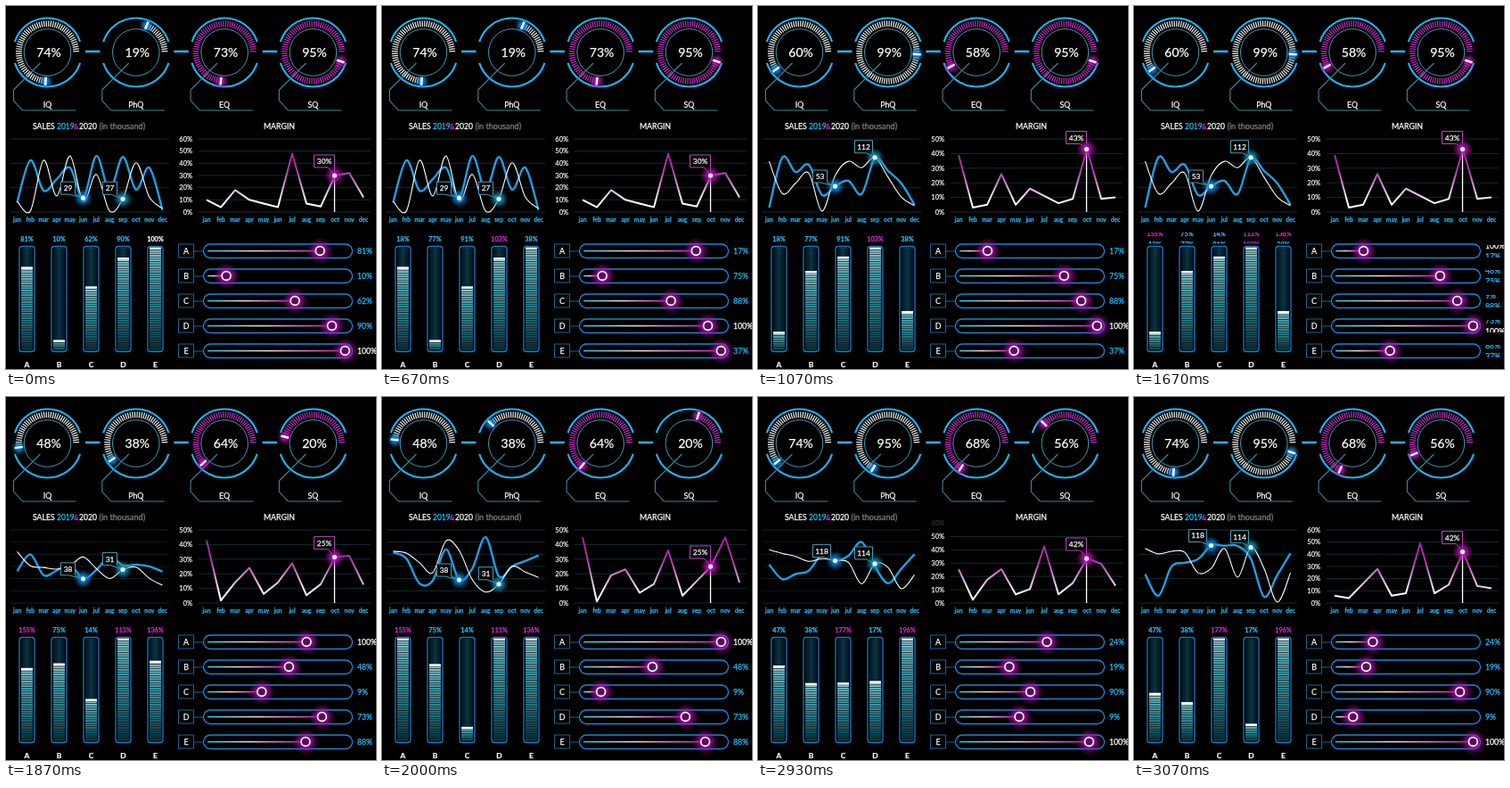
Write an HTML page that moves like this. It is 415 px wide and 407 px high and loops after 3140 ms.

```html
<!DOCTYPE html>
<html lang="en">
<head>
<meta charset="utf-8">
<title>Dashboard</title>
<style>
html, body { margin: 0; width: 100%; height: 100%; overflow: hidden; background: #000; }
svg { display: block; width: 415px; height: 407px; font-family: Lato, "Open Sans", sans-serif; }
text { fill: currentColor; stroke: currentColor; stroke-width: .25px; }
</style>
</head>
<body>
<svg id="stage" viewBox="0 0 415 407">
  <defs>
    <linearGradient id="heat" gradientUnits="userSpaceOnUse" x1="0" y1="155" x2="0" y2="231">
      <stop offset="0" stop-color="#a5189f"/><stop offset=".4" stop-color="#ad3aab"/>
      <stop offset=".85" stop-color="#fff"/><stop offset="1" stop-color="#fff"/>
    </linearGradient>
    <linearGradient id="fill" x1="0" y1="0" x2="0" y2="1">
      <stop offset="0" stop-color="#a4dfe8"/><stop offset=".25" stop-color="#55b3c1"/>
      <stop offset=".6" stop-color="#2f8796"/><stop offset="1" stop-color="#0e3743"/>
    </linearGradient>
    <linearGradient id="tube">
      <stop offset="0" stop-color="#03121a"/><stop offset=".5" stop-color="#0b3443"/>
      <stop offset="1" stop-color="#03121a"/>
    </linearGradient>
    <linearGradient id="wire">
      <stop offset="0" stop-color="#2fbfd8"/><stop offset=".45" stop-color="#e6d6e6"/>
      <stop offset="1" stop-color="#cc1cc4"/>
    </linearGradient>
    <pattern id="stripes" width="4" height="2.6" patternUnits="userSpaceOnUse">
      <rect width="4" height="1" fill="#000" fill-opacity=".75"/>
    </pattern>
  </defs>
</svg>
<script>
const LOOP = 3140, STEP = 200 / 3;

// When the cell labels roll and the charts morph, in steps
const cues = [
  { roll: [7, 10], morph: [10, 16] },
  { roll: [23.2, 27], morph: [25, 30] },
  { roll: [38.1, 41.4], morph: [40, 46] }];

// One row per data set; _ lies halfway between its neighbours
const _ = null;
const gauges = [[74, 19, 73, 95], [60, 99, 58, 95], [48, 38, 64, 20], [74, 95, 68, 56]];
const bars = [[81, 10, 62, 90, 100], [18, 77, 91, 103, 38], [155, 75, 14, 113, 136], [47, 38, 177, 17, 196]];
const sales19 = [
  [20, 106, 44, _, 91, 29, 115, 44, 113, 46, 91, 4],
  [9, 112, 82, 97, 35, 53, 64, 37, 110, _, 59, 15],
  [83, 73, 32, 37, 88, 38, 57, 108, 44, 60, _, 78],
  [59, 15, 75, _, 90, 118, _, 117, 91, 13, _, 102]].map(fillGaps);
const sales20 = [
  [22, 2, 106, 33, 115, 22, 77, 2, 27, 101, 31, 7],
  [104, 38, _, 80, 2, 75, 104, 91, 112, _, 31, 13],
  [85, 82, _, 50, 102, 86, 38, 18, 31, 60, _, 42],
  [112, 101, 106, 104, 62, 71, 112, 53, 114, 71, 2, 62]].map(fillGaps);
const margin = [
  [10, 4, 18, 10, _, 4, 48, 7, 4.5, 30, 32, 12],
  [39, 3, 5, 26, 5, 16, _, 6, 9, 43, 9, 10],
  [45, 1, 19, 23, 7, 13, 36, 5, _, 25, 45, 14],
  [6, 4, _, 28, 6, 8, 49, 8, 15, 42, 14, 12]].map(fillGaps);

function fillGaps(row) {
  return row.map((v, i) => v === _ ? (row[i - 1] + row[i + 1]) / 2 : v);
}
// Axis maximum: a tenth of headroom, rounded up to the unit
const axisTop = (row, unit) => Math.ceil(Math.max(...row) * 1.1 / unit) * unit;
const salesTops = sales19.map((row, i) => axisTop([...row, ...sales20[i]], 30));
const marginTops = margin.map(row => axisTop(row, 10));
const sliders = bars.map(row => row.map(v => Math.round(100 * v / Math.max(...row))));
const levels = bars.map(row => row.map(v => Math.min(100, v)));

const BLUE = '#2cb9f6', PINK = '#d822d0', WHITE = '#fff';
const BASE = 231, TALL = 82;
const months = 'jan feb mar apr may jun jul aug sep oct nov dec'.split(' ');
const JUN = 5, SEP = 8, OCT = 9;
const letters = [...'ABCDE'];
const stage = document.getElementById('stage');
const defs = stage.querySelector('defs');

function set(node, attrs) {
  for (const k in attrs) node.setAttribute(k, attrs[k]);
  return node;
}
function add(tag, attrs, parent = stage) {
  return parent.appendChild(set(document.createElementNS('http://www.w3.org/2000/svg', tag), attrs));
}
function label(x, y, str, size, color = WHITE, anchor = 'middle', weight = 400, parent = stage) {
  const node = add('text', { x, y, color, 'font-size': size, 'text-anchor': anchor, 'font-weight': weight }, parent);
  node.textContent = str;
  return node;
}
const line = (d, stroke, width = 1, parent = stage) =>
  add('path', { d, stroke, 'stroke-width': width, fill: 'none' }, parent);

function glow(id, color) {
  const g = add('radialGradient', { id }, defs);
  [[0, 1], [0.4, 0.75], [0.75, 0.25], [1, 0]].forEach(([offset, a]) =>
    add('stop', { offset, 'stop-color': color, 'stop-opacity': a }, g));
  return `url(#${id})`;
}
const glowBlue = glow('gb', '#0f86dc'), glowTeal = glow('gt', '#1690b4'), glowPink = glow('gp', '#b012ac');

const lerp = (a, b, p) => a + (b - a) * p;
const clamp = v => Math.max(0, Math.min(1, v));
const ease = p => p * p * (3 - 2 * p);
const salesX = i => 12.5 + 14.82 * i;
const marginX = i => 225 + 16 * i;
const level = (v, top) => BASE - v / top * TALL;

// Gauges: ticks run anticlockwise from three o'clock
const dials = ['IQ', 'PhQ', 'EQ', 'SQ'].map((name, i) => {
  const cx = 46.5 + 99.3 * i, cy = 52, pink = i > 1;
  const at = (v, r) => {
    const a = -v * Math.PI / 50;
    return [cx + r * Math.cos(a), cy + r * Math.sin(a)];
  };
  const ray = (v, a, b) => `M${at(v, a)}L${at(v, b)}`;
  const arc = (a, b, r) => `M${at(a, r)}A${r} ${r} 0 0 0 ${at(b, r)}`;
  if (i < 3) line(`M${cx + 42.5} 51H${cx + 59}`, '#22b2f0', 2.6);
  line(arc(5, 45, 38.5) + arc(55, 95, 38.5), '#1fb4f4', 2.1);
  add('circle', { cx, cy, r: 26.3, fill: 'none', stroke: '#4598b0', 'stroke-width': 1 });
  line(`M${cx - 8} 64L${cx - 38} 94V106L${cx - 28} 117H${cx + 32}`, '#3a879c', 1.1);
  const ticks = line('', pink ? '#c02abf' : '#eee', 1.2);
  const halo = add('circle', { r: 9, fill: pink ? glowPink : glowBlue });
  const mark = line('', WHITE, 2.4);
  label(cx, 114, name, 8.8);
  const text = label(cx + 1.5, 57, '', 14);
  return (v, shown) => {
    let d = '';
    for (let k = 0.6; k < v; k += 1.25) d += ray(k, 28.8, 35.6);
    set(ticks, { d });
    set(mark, { d: ray(v, 28, 37) });
    const [x, y] = at(v, 32.5);
    set(halo, { cx: x, cy: y });
    text.textContent = shown + '%';
  };
});

// Titles
label(30, 138, 'SALES', 8.7, WHITE, 'start');
label(57, 138, '2019', 8.5, BLUE, 'start');
label(76.3, 138, '&', 7, PINK, 'start', 700);
label(82, 138, '2020', 8.6, WHITE, 'start');
label(104.5, 138, '(in thousand)', 9.1, '#858585', 'start');
label(306.5, 138, 'MARGIN', 8.8);

// Grids and axes
const coarse = grid(3), fine = grid(6);
function grid(n) {
  const g = add('g', {});
  for (let i = 0; i <= n; i++) line(`M5 ${BASE - TALL * i / n}H183`, '#122b36', 1, g);
  return g;
}
const scale = Array.from({ length: 7 }, (_, i) => {
  const g = add('g', {});
  line('M216 0H409', '#122b36', 1, g);
  label(209, 2.7, i * 10 + '%', 7.5, '#eee', 'end', 400, g);
  return g;
});
months.forEach((m, i) => [salesX, marginX].forEach(f => label(f(i), 242, m, 6.7, '#1fb0ea', 'middle', 700)));

// Line charts
function smooth(pts) {
  const at = i => pts[Math.max(0, Math.min(pts.length - 1, i))];
  let d = 'M' + pts[0];
  for (let i = 0; i < pts.length - 1; i++) {
    const [a, b, c, e] = [at(i - 1), at(i), at(i + 1), at(i + 2)];
    d += `C${[0, 1].map(k => b[k] + (c[k] - a[k]) / 6)} ${[0, 1].map(k => c[k] - (e[k] - b[k]) / 6)} ${c}`;
  }
  return d;
}
const line19 = line('', '#209fe2', 2.4), line20 = line('', WHITE, 1.1);
const marginLine = set(line('', 'url(#heat)', 2), { 'stroke-linejoin': 'round' });
const drop = line('', WHITE, 1.3);

function callout(x, left, gap, color, halo, r) {
  const box = add('path', { fill: '#000', stroke: color });
  const aura = add('circle', { cx: x, r, fill: halo });
  const dot = add('circle', { cx: x, r: 2.6, fill: '#f2faff' });
  const text = label(0, 0, '', 8.4);
  return (y, str) => {
    const w = str.endsWith('%') ? 23 : 8 + 4 * str.length;
    const t = Math.max(140.5, y - gap - 14), b = t + 14, e = left + w;
    set(box, { d: `M${left} ${t}H${e}V${b}L${x} ${y}L${e - 7} ${b}H${left}Z` });
    set(aura, { cy: y });
    set(dot, { cy: y });
    set(text, { x: left + w / 2, y: t + 10 });
    text.textContent = str;
  };
}
const junNote = callout(86.5, 61.5, 4, '#4a9fb5', glowBlue, 11);
const sepNote = callout(131, 108.5, 5, '#4a9fb5', glowTeal, 11);
const octNote = callout(368.5, 345.5, 9, '#bb44b9', glowPink, 12);

// Value labels that roll downwards inside a clipped cell
function roller(id, x, y, size, anchor, weight, clip) {
  add('rect', clip, add('clipPath', { id }, defs));
  const g = add('g', { 'clip-path': `url(#${id})` });
  const pair = [0, 1].map(() => label(x, y, '', size, BLUE, anchor, weight, g));
  return (a, b, p) => [a, b].forEach((v, k) => {
    set(pair[k], {
      y: y + 12 * (p - k),
      color: v > 100 ? PINK : v === 100 ? WHITE : BLUE,
      visibility: (k ? p > 0 : p < 1) ? 'visible' : 'hidden'
    });
    pair[k].textContent = v + '%';
  });
}

// Bars
const columns = letters.map((s, i) => {
  const cx = 23.5 + 36 * i, x = cx - 8.5;
  add('rect', { x: x + 2, y: 271, width: 13, height: 115, fill: 'url(#tube)' });
  const body = add('rect', { x: x + 2, width: 13, fill: 'url(#fill)' });
  const lines = add('rect', { x: x + 2, width: 13, fill: 'url(#stripes)' });
  const cap = add('rect', { x: x + 2, width: 13, height: 2.4, fill: WHITE });
  add('rect', { x, y: 269.5, width: 17, height: 118, rx: 3, fill: 'none', stroke: '#1b78c4', 'stroke-width': 1.3 });
  label(cx, 405, s, 8.4, WHITE, 'middle', 700);
  const roll = roller('top' + i, cx, 264.3, 7.3, 'middle', 700, { x: cx - 16, y: 254, width: 32, height: 12.5 });
  const move = v => {
    const height = 1.155 * v, y = 386.5 - height;
    set(body, { y, height });
    set(lines, { y, height });
    set(cap, { y: y - 0.5 });
  };
  return { roll, move };
});

// Sliders
const tracks = letters.map((s, i) => {
  const y = 275 + 28 * i;
  add('rect', { x: 193.5, y: y - 8, width: 17, height: 15, fill: 'none', stroke: '#1f6390' });
  line(`M210.5 ${y}H221`, '#1f6390');
  label(202, y + 3.2, s, 8.9);
  add('rect', { x: 221.5, y: y - 8, width: 167, height: 15.5, rx: 7.75, fill: 'none', stroke: '#1b84d6', 'stroke-width': 1.3 });
  const wire = add('rect', { x: 226, y: y - 1.2, height: 1.6, fill: 'url(#wire)' });
  const aura = add('circle', { cy: y - 0.5, r: 15, fill: glowPink });
  const knob = add('circle', { cy: y - 0.5, r: 4.9, fill: '#5c0a5c', stroke: WHITE, 'stroke-width': 1.7 });
  const roll = roller('side' + i, 394, y + 3, 8.7, 'start', 400, { x: 391, y: y - 7, width: 24, height: 14 });
  const move = v => {
    const cx = 232.3 + 1.48 * v;
    set(wire, { width: cx - 231 });
    set(aura, { cx });
    set(knob, { cx });
  };
  return { roll, move };
});

function phase(n, kind) {
  for (let i = 0; i < cues.length; i++) {
    const [a, b] = cues[i][kind];
    if (n < b) return [i, clamp((n - a) / (b - a))];
  }
  return [cues.length - 1, 1];
}

function draw(t) {
  const n = Math.floor(t / STEP + 0.01);
  const [r, rp] = phase(n, 'roll');
  const [c, cp] = phase(n, 'morph');
  const p = ease(cp), now = cp > 0 ? c + 1 : c;
  const blend = list => lerp(list[c], list[c + 1], p);
  const mix = table => table[c].map((v, i) => lerp(v, table[c + 1][i], p));

  mix(gauges).forEach((v, i) => dials[i](v, gauges[now][i]));

  const most = blend(salesTops);
  const [a, b] = [sales19, sales20].map(s => mix(s).map(v => level(v, most)));
  set(line19, { d: smooth(a.map((y, i) => [salesX(i), y])) });
  set(line20, { d: smooth(b.map((y, i) => [salesX(i), y])) });
  junNote(a[JUN], '' + sales19[now][JUN]);
  sepNote(b[SEP], '' + sales20[now][SEP]);
  const f = (150 - most) / 30;
  set(coarse, { opacity: 1 - f });
  set(fine, { opacity: f });

  const top = blend(marginTops);
  scale.forEach((g, i) => {
    const y = level(i * 10, top);
    set(g, { transform: `translate(0 ${y})`, opacity: clamp(1 - (148.9 - y) / 9) });
  });
  const m = mix(margin).map(v => level(v, top));
  set(marginLine, { d: 'M' + m.map((y, i) => [marginX(i), y]).join('L') });
  set(drop, { d: `M368.5 ${m[OCT]}V${BASE}` });
  octNote(m[OCT], margin[now][OCT] + '%');

  mix(levels).forEach((v, i) => columns[i].move(v));
  mix(sliders).forEach((v, i) => tracks[i].move(v));
  columns.forEach((o, i) => o.roll(bars[r][i], bars[r + 1][i], rp));
  tracks.forEach((o, i) => o.roll(sliders[r][i], sliders[r + 1][i], rp));
}

const start = performance.now();
function tick() {
  draw((performance.now() - start) % LOOP);
  requestAnimationFrame(tick);
}
tick();
</script>
</body>
</html>
```
